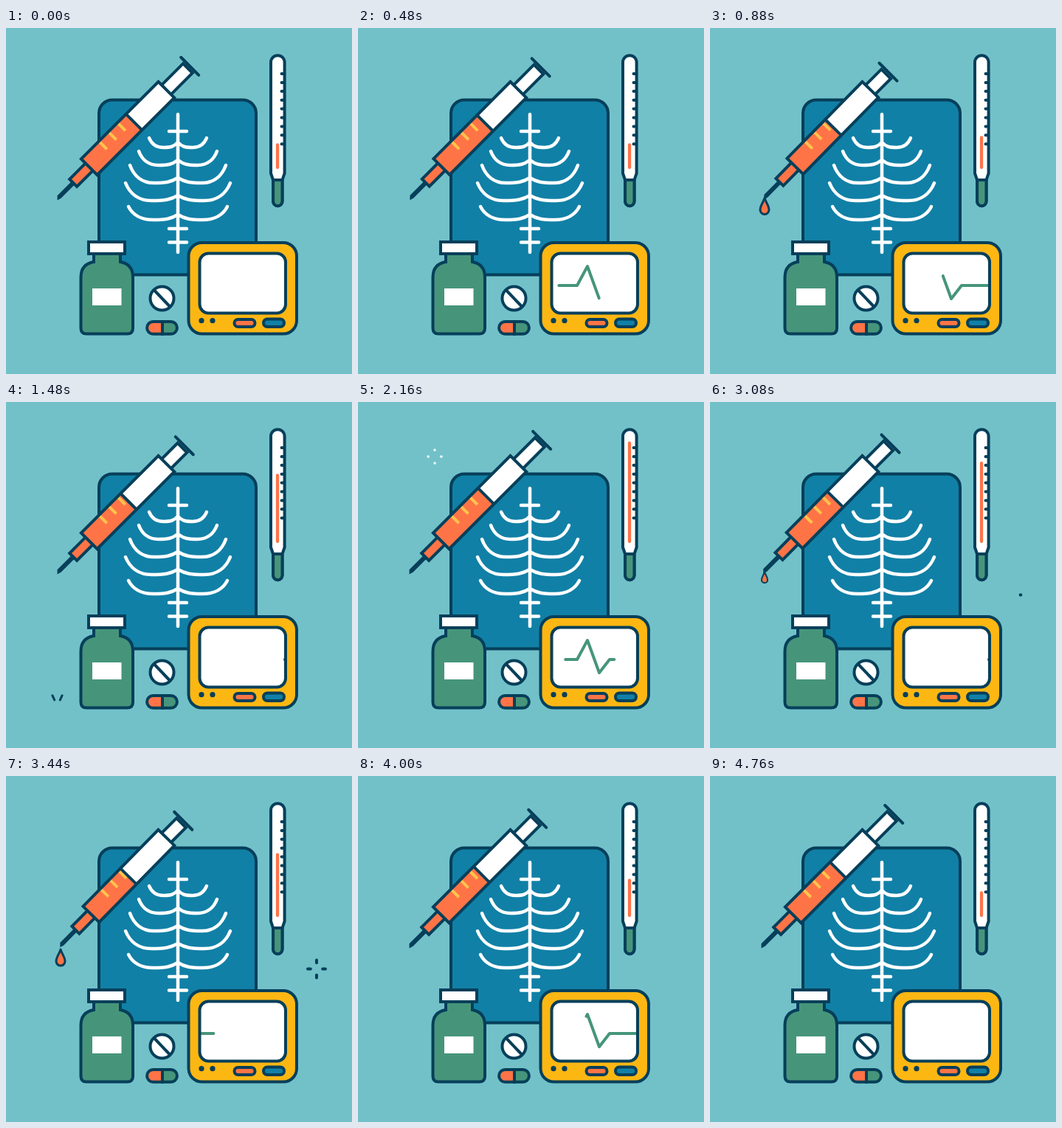
Animation, 469 px wide and 469 px high, one loop 4800 ms. Source, as an HTML page:

```html
<!DOCTYPE html>
<html lang="en">
<head>
<meta charset="utf-8">
<title>Medical kit</title>
<style>
  html, body { margin: 0; height: 100%; overflow: hidden; background: #72c1c9; }
  svg { display: block; width: 100vw; height: 100vh; }
  .line { fill: none; stroke: #063f5a; stroke-width: 4; }
  .round { stroke-linecap: round; stroke-linejoin: round; }
  .bone { fill: none; stroke: #fff; stroke-width: 4.5; stroke-linecap: round; }
  .navy { fill: #063f5a; }
  .white { fill: #fff; }
  .blue { fill: #1180a6; }
  .green { fill: #46957a; }
  .orange { fill: #ff7446; }
  .yellow { fill: #fdb713; }
</style>
</head>
<body>
<svg viewBox="0 0 469 469">
  <!-- x-ray -->
  <rect class="line blue" x="126" y="97.5" width="213" height="237" rx="18"/>
  <path class="bone" d="M233 117V304M221 140h24M221 272h24M221 290.500h24"/>
  <path class="bone" id="ribs"/>

  <!-- thermometer -->
  <path class="line white" d="M359 46.500a9.300 9.300 0 0 1 18.600 0V197L374.500 206V235a6.200 6.200 0 0 1-12.400 0V206L359 197Z"/>
  <path class="line green" d="M362.100 206h12.400v29a6.200 6.200 0 0 1-12.400 0Z"/>
  <path class="line round" id="ticks"/>
  <path class="round" id="mercury" fill="none" stroke="#ff7446" stroke-width="4.300"/>

  <!-- bottle -->
  <path class="line green" d="M119 306V317Q101.500 320 101.500 338V407q0 7.500 7.500 7.500H164.500q7.500 0 7.500-7.500V338Q172 320 155 317V306Z"/>
  <rect class="line white" x="112" y="290" width="49" height="16"/>
  <rect class="white" x="117" y="353" width="39.500" height="23"/>

  <!-- pills -->
  <circle class="line white" cx="211.500" cy="366.500" r="16"/>
  <path class="line" d="M200.500 355L222.500 378"/>
  <path class="line orange" d="M212 398H199.500a8.400 8.400 0 0 0 0 16.800H212Z"/>
  <path class="line green" d="M212 398h11.500a8.400 8.400 0 0 1 0 16.800H212Z"/>

  <!-- monitor -->
  <rect class="line yellow" x="247.500" y="291" width="146.500" height="123.500" rx="18"/>
  <rect class="white" x="262.500" y="305.500" width="116.500" height="81" rx="12"/>
  <path class="round" id="pulse" pathLength="1" fill="none" stroke="#46957a" stroke-width="4" d="M265 349H297L311 323L327 367L341 349H378"/>
  <rect class="line" x="262.500" y="305.500" width="116.500" height="81" rx="12"/>
  <circle class="navy" cx="265" cy="396.700" r="3.600"/>
  <circle class="navy" cx="280" cy="396.700" r="3.600"/>
  <rect class="line orange" x="309.500" y="395" width="28" height="10" rx="5"/>
  <rect class="line blue" x="349" y="394.500" width="28" height="10.500" rx="5.250"/>

  <!-- syringe, drawn along its axis from the needle tip -->
  <g transform="translate(71 230) rotate(-45)">
    <g id="plunger">
      <rect class="line white" x="195" y="-9" width="53" height="18"/>
      <path class="line round" d="M252-17V17"/>
    </g>
    <g id="barrel">
      <path class="navy" d="M-3.500 1.500L1-3H30V3H2Z"/>
      <rect class="line orange" x="28.500" y="-7" width="31" height="14"/>
      <rect class="white" x="59" y="-15.300" width="148" height="30.600"/>
      <rect class="orange" id="fluid" x="59" y="-15.300" height="30.600"/>
      <path id="marks" fill="none" stroke="#ffc34d" stroke-width="4"/>
      <path class="line" id="seal"/>
      <rect class="line" x="59" y="-15.300" width="148" height="30.600"/>
    </g>
  </g>
  <path class="line orange round" id="drop" style="stroke-width:3" d="M0 .5C2 7 6 11 6 16.500a6 6 0 0 1-12 0C-6 11-2 7 0 .5Z"/>
  <path class="line round" id="splash" style="stroke-width:3"/>

  <!-- sparkles -->
  <path class="line round" id="spark"/>
  <path class="round" id="glint" fill="none" stroke="#fff" stroke-width="3.500" stroke-opacity=".85"/>
</svg>
<script>
const LOOP = 4800, INJECT = 2400, BEAT = 1600;
const $ = id => document.getElementById(id);
const set = (id, name, value) => $(id).setAttribute(name, value);
const ramp = (t, a, b) => Math.min(1, Math.max(0, (t - a) / (b - a)));
const smooth = (t, a, b) => (1 - Math.cos(Math.PI * ramp(t, a, b))) / 2;

// Each rib: outer x, outer y, depth; mirrored about the spine
const ribs = [[194, 149, 13], [180, 167, 19], [168, 186, 24], [162, 210, 24], [166, 242, 18]];
set('ribs', 'd', ribs.map(([x, y, d]) => [1, -1].map(side => {
  const at = (k, depth) => `${233 - side * (233 - x) * (1 - k)} ${y + depth}`;
  return `M${at(0, 0)}C${at(.08, d * .6)} ${at(.25, d)} ${at(.5, d)}S${at(.85, d - 1)} ${at(1, d - 7)}`;
}).join('')).join(''));
set('ticks', 'd', Array.from({ length: 9 }, (_, i) => `M373.500 ${62 + i * 11.900}h2.500`).join(''));

function sparkle(id, x, y, radius, t, start) {
  const u = (t - start) / 520;
  if (u <= 0 || u >= 1) return set(id, 'd', '');
  const head = radius * smooth(u, 0, .7), tail = radius * smooth(u, .4, 1);
  set(id, 'd', [[1, 0], [-1, 0], [0, 1], [0, -1]].map(([dx, dy]) =>
    `M${x + dx * tail} ${y + dy * tail}L${x + dx * head} ${y + dy * head}`).join(''));
}

function drawSyringe(t) {
  const push = 12.700 * (smooth(t, 260, 1080) - smooth(t, 1200, 2220));
  const level = 145 - push;
  set('plunger', 'transform', `translate(${-push})`);
  set('fluid', 'width', level - 59);
  set('seal', 'd', `M${level}-15V15`);
  set('marks', 'd', [93, 111, 128.500].filter(x => x < level - 2).map(x => `M${x}-14V0`).join(''));

  // The barrel gives a little under pressure, held at its upper end
  const strain = smooth(t, 300, 900) - smooth(t, 1080, 1450);
  set('barrel', 'transform',
    `translate(207) rotate(${-.5 * strain}) scale(${1 - .017 * strain} 1) translate(-207)`);

  const size = Math.sin(ramp(t, 520, 860) * Math.PI / 2);
  const fall = .0007 * Math.max(0, t - 960) ** 2;
  set('drop', 'visibility', size > 0 && t < 1420 ? 'visible' : 'hidden');
  set('drop', 'transform', `translate(74 ${230 + fall}) scale(${size})`);

  const head = ramp(t, 1400, 1486), tail = ramp(t, 1400, 1550);
  const point = (side, k) => `${69.500 + side * 7 * k} ${412 - 15 * k}`;
  set('splash', 'd', head > tail
    ? [-1, 1].map(side => `M${point(side, tail)}L${point(side, head)}`).join('') : '');
}

function drawPulse(t) {
  const head = smooth(t, 116, 735), tail = smooth(t, 320, 1520);
  set('pulse', 'visibility', head - tail > .001 ? 'visible' : 'hidden');
  set('pulse', 'stroke-dasharray', `${head - tail} 2`);
  set('pulse', 'stroke-dashoffset', -tail);
}

function draw(now) {
  const t = now % LOOP;
  drawSyringe(t % INJECT);
  drawPulse(t % BEAT);
  const heat = smooth(t, 530, 2280) - smooth(t, 2240, 4640);
  set('mercury', 'd', `M368 ${158.500 - 104 * heat}V189`);
  sparkle('spark', 421, 261.500, 12, t, t < 2000 ? 920 : 3040);
  sparkle('glint', 104, 74, 9, t, 1680);
}

const begin = performance.now();
(function tick() {
  draw(performance.now() - begin);
  requestAnimationFrame(tick);
})();
</script>
</body>
</html>
```
